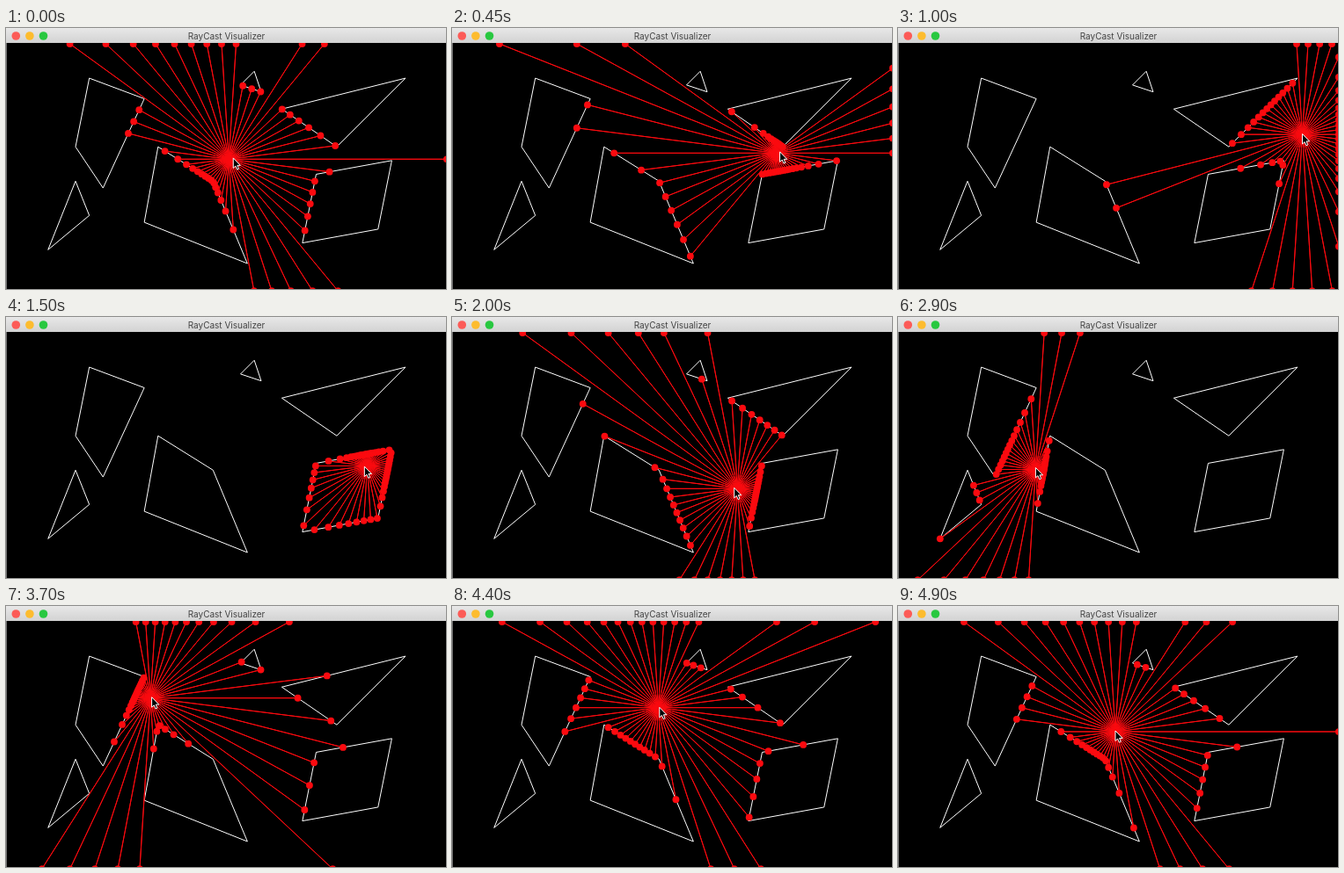
Write an HTML page with a canvas that moves like this. It is 500x297 px and loops after 4.95 s.

```html
<!DOCTYPE html>
<html lang="en">
<head>
<meta charset="utf-8">
<title>RayCast Visualizer</title>
<style>
  html, body { margin: 0; width: 100%; height: 100%; overflow: hidden; background: #000; }
  canvas { display: block; }
</style>
</head>
<body>
<canvas id="stage" width="500" height="297"></canvas>
<script>
const ctx = document.getElementById('stage').getContext('2d');
const LOOP = 4950, STEP = 50, RAYS = 50, POINTER_LEAD = 20;
const SCALE = 500 / 640, LEFT = 0.9, TOP = 18, BAR = 17;
const RED = '#fb0a0f';

// Everything below the title bar lives in a 640 x 360 scene.
const walls = [[0, 0], [640, 0], [640, 360], [0, 360]];
const shapes = [
  [[100, 150], [120, 50], [200, 80], [140, 210]],
  [[100, 200], [120, 250], [60, 300]],
  [[200, 260], [220, 150], [300, 200], [350, 320]],
  [[340, 60], [360, 40], [370, 70]],
  [[450, 190], [560, 170], [540, 270], [430, 290]],
  [[400, 95], [580, 50], [480, 150]]
];
const segments = [...shapes, walls].flatMap(points =>
  points.map((p, i) => [p, points[(i + 1) % points.length]]));

// Key points of the pointer path: time in ms, x, y.
const path = [
  [0, 323, 168], [550, 498, 156], [1000, 587, 132], [1250, 572, 168], [2000, 414, 227],
  [2900, 199, 199], [3300, 203, 151], [3700, 209, 111], [4400, 299, 125], [4900, 315, 160]
];

// Tangent at a key point; zero where the motion turns back.
function slope(i, axis) {
  const a = path[i - 1] || path[i], b = path[i], c = path[i + 1] || b;
  if ((b[axis] - a[axis]) * (c[axis] - b[axis]) < 0) return 0;
  return (c[axis] - a[axis]) / (c[0] - a[0]);
}

function positionAt(time) {
  const t = Math.min(time, path.at(-1)[0]);
  const next = Math.max(1, path.findIndex(key => key[0] >= t));
  const a = path[next - 1], b = path[next], span = b[0] - a[0];
  const u = (t - a[0]) / span, v = 1 - u;
  return [1, 2].map(axis =>
    a[axis] * v * v * (1 + 2 * u) + b[axis] * u * u * (1 + 2 * v) +
    span * u * v * (slope(next - 1, axis) * v - slope(next, axis) * u));
}

function castRay([x, y], angle) {
  const dx = Math.cos(angle), dy = Math.sin(angle);
  let nearest = Infinity;
  for (const [[ax, ay], [bx, by]] of segments) {
    const ex = bx - ax, ey = by - ay, det = dx * ey - dy * ex;
    if (Math.abs(det) < 1e-9) continue;
    const dist = ((ax - x) * ey - (ay - y) * ex) / det;
    const along = ((ax - x) * dy - (ay - y) * dx) / det;
    if (dist > 0 && along >= 0 && along <= 1) nearest = Math.min(nearest, dist);
  }
  return [x + dx * nearest, y + dy * nearest];
}

function strokeLine(points, color) {
  ctx.strokeStyle = color;
  ctx.beginPath();
  points.forEach(p => ctx.lineTo(...p));
  ctx.closePath();
  ctx.stroke();
}

function disc(x, y, radius, color) {
  ctx.fillStyle = color;
  ctx.beginPath();
  ctx.arc(x, y, radius, 0, 2 * Math.PI);
  ctx.fill();
}

function drawScene(light) {
  ctx.lineWidth = 1 / SCALE;
  shapes.forEach(shape => strokeLine(shape, '#fff'));
  for (let i = 0; i < RAYS; i++) {
    const hit = castRay(light, i * 2 * Math.PI / RAYS);
    strokeLine([light, hit], RED);
    disc(...hit, 5, RED);
  }
}

function drawCursor([x, y]) {
  ctx.translate(x, y);
  ctx.scale(1 / SCALE, 1 / SCALE);
  ctx.lineWidth = 1;
  ctx.strokeStyle = '#fff';
  ctx.fillStyle = '#000';
  const arrow = new Path2D('M0-1v11.5l2.6-2.4 1.8 4.1 1.9-.8-1.7-4h3.6z');
  ctx.fill(arrow);
  ctx.stroke(arrow);
}

function drawTitleBar() {
  const shade = ctx.createLinearGradient(0, 0, 0, BAR);
  shade.addColorStop(0, '#e8e8e8');
  shade.addColorStop(1, '#d2d2d2');
  ctx.fillStyle = shade;
  ctx.fillRect(0, 0, 500, BAR);
  ['#fc5b57', '#fdbc2e', '#28c840'].forEach((color, i) => disc(11.3 + i * 15.6, 9, 4.8, color));
  ctx.fillStyle = '#444';
  ctx.font = '10px Inter, sans-serif';
  ctx.textAlign = 'center';
  ctx.fillText('RayCast Visualizer', 250.5, 12.8);
}

function render(now) {
  const time = Math.floor(now % LOOP / STEP) * STEP;
  ctx.fillStyle = '#000';
  ctx.fillRect(0, 0, 500, 297);
  ctx.fillStyle = '#777';
  ctx.fillRect(0, 0, 1, 297);
  ctx.save();
  ctx.translate(LEFT, TOP);
  ctx.scale(SCALE, SCALE);
  drawScene(positionAt(time));
  drawCursor(positionAt(time + POINTER_LEAD)); // the light trails the pointer
  ctx.restore();
  drawTitleBar();
  requestAnimationFrame(render);
}
requestAnimationFrame(render);
</script>
</body>
</html>
```
